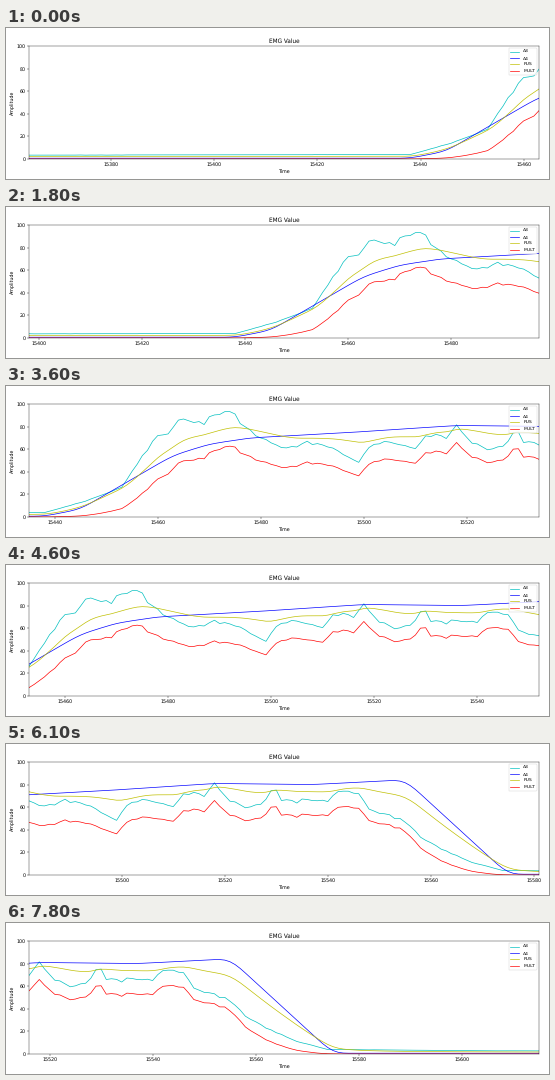
A matplotlib script that plays this animation: 543 by 151 pixels, repeating every 8000 ms.

```python
import numpy as np
import matplotlib.pyplot as plt
from matplotlib.animation import FuncAnimation
from matplotlib.ticker import MultipleLocator

W, H, DPI = 543, 151, 32.8
START = 15000   # key points below are offsets from this sample number
SPAN = 99       # samples in view
STEPS = 80

plt.rcParams.update({
    "font.family": "DejaVu Sans",
    "font.size": 10.5,
    "legend.fontsize": 10,
    "text.hinting": "none",
    "axes.formatter.useoffset": False,
})

t = np.arange(350, 631)
rng = np.random.default_rng(4)


def through(points):
    return np.interp(t, *zip(*points))


def soften(v, n):
    """Round the corners with an n-sample window."""
    window = np.hanning(n + 2)[1:-1]
    padded = np.pad(v, n // 2, mode="edge")
    return np.convolve(padded, window / window.sum(), mode="valid")


def envelope(v, attack, release):
    """Follow a signal, rising faster than falling."""
    out = [v[0]]
    for x in v[1:]:
        rate = attack if x > out[-1] else release
        out.append(out[-1] + rate * (x - out[-1]))
    return np.array(out)


# muscle bursts: sharp turns plus jitter that grows with the level
a3 = through([
    (365, 3.4), (438, 4), (446, 14), (453, 26), (457, 54), (460, 72),
    (462, 73), (464, 86), (469, 83.5), (471, 90.5), (475, 91), (476, 82),
    (479, 72), (484, 61), (489, 66), (494, 61), (499, 48), (501, 62),
    (504, 67), (510, 61), (512, 71), (516, 72), (518, 80), (521, 66),
    (524, 59), (527, 62), (529, 74), (530, 75), (531, 66), (540, 66),
    (542, 74), (544, 75), (546, 71), (548, 58), (555, 48), (558, 34),
    (562, 23), (568, 11), (574, 4), (605, 2.8),
])
a3 += rng.normal(0, 0.012, t.size) * a3

# slow activation, the fused level and the product of both sensors
a4 = soften(through([
    (438, .7), (445, 7), (458, 41.5), (463, 54.5), (470, 64.5), (478, 70),
    (498, 75), (518, 81), (537, 80), (555, 84.2), (575, .7),
]), 7)
fus = soften((a4 + envelope(a3, 0.3, 0.18)) / 2, 3)
mult = a3 * a4 / 100

# (step, left edge) along the scroll, and steps where the view stalls
scroll = [(0, 364), (18, 398), (27, 412), (36, 435),
          (56, 471), (69, 500), (78, 516)]
stalls = {16, 17, 35, 57, 64, 67, 68, 76, 79}

fig = plt.figure(figsize=((W + .01) / DPI, (H + .01) / DPI), dpi=DPI,
                 facecolor="white")
ax = fig.add_axes([23 / W, 20 / H, 510 / W, 113 / H])
for data, color, name in ((a3, "c", "A3"), (a4, "b", "A4"),
                          (fus, "y", "FUS"), (mult, "r", "MULT")):
    ax.plot(t + START, data, color, label=name)
ax.set(title="EMG Value", xlabel="Time", ylabel="Amplitude", ylim=(0, 100))
ax.xaxis.set_major_locator(MultipleLocator(20))
legend = ax.legend(loc="upper right")


def update(i):
    while i in stalls:
        i -= 1
    left = START + round(float(np.interp(i, *zip(*scroll))))
    ax.set_xlim(left, left + SPAN)
    # the legend hops to the other corner now and then
    hop = i < 56 and i % 4 == 3
    legend.set_loc("upper left" if hop else "upper right")
    return []


anim = FuncAnimation(fig, update, frames=STEPS, interval=100,
                     init_func=lambda: update(0), repeat=True,
                     repeat_delay=0, blit=False)
plt.show()
```
